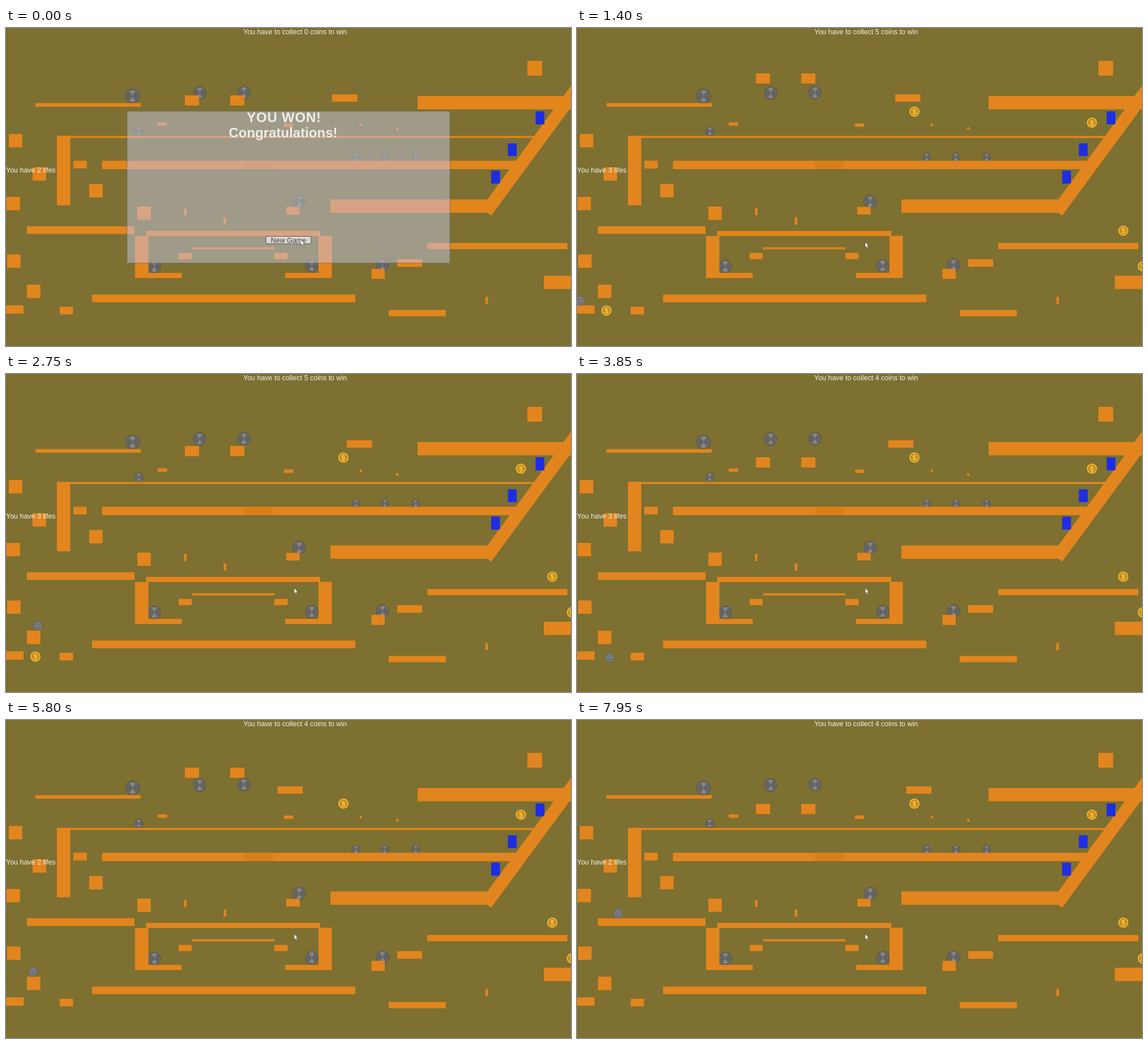
An HTML page that plays this animation: 998 px wide and 561 px high, repeating every 8 s.

```html
<!DOCTYPE html>
<html lang="en">
<head>
<meta charset="utf-8">
<title>Platform game</title>
<style>
  html, body { margin: 0; width: 100%; height: 100%; overflow: hidden; background: #7d7031; }
  svg { display: block; width: 100vw; height: 100vh; }
  text { font: 12.48px "Liberation Sans", Arial, sans-serif; fill: #f3f2ec; }
  .title { font-size: 24px; font-weight: bold; fill: #ededea; text-anchor: middle; }
  .wide { letter-spacing: .8px; }
  .button { fill: #44423f; text-anchor: middle; }
  .beams { stroke: #e2851e; fill: none; }
  .solid { fill: #e2851e; stroke: none; }
</style>
</head>
<body>
<svg viewBox="0 0 998 561">
  <defs>
    <g id="saw">
      <circle r="11.1" fill="#646465" stroke="#4a4a4a" stroke-width=".9" stroke-dasharray="2.2 .6"/>
      <circle r="9.6" fill="none" stroke="#757576" stroke-width=".6"/>
      <path d="M-4.6-7.8A9 9 0 0 1 4.6-7.8L-4.6 7.8A9 9 0 0 0 4.6 7.8Z" fill="#868687"/>
      <circle r="2.6" fill="#5c5c5c"/>
      <circle r="1.3" fill="#8a8a7c"/>
    </g>
    <use id="chip" href="#saw" transform="scale(.65)"/>
    <g id="coin">
      <circle r="9" fill="#f0bd3d"/>
      <circle r="7.2" fill="#c98a14"/>
      <text y="4.5" text-anchor="middle" style="font-size:12.5px;font-weight:bold;fill:#f6cd55">$</text>
    </g>
    <!-- blends the translucent panel in linear light -->
    <filter id="glass" filterUnits="userSpaceOnUse" x="0" y="0" width="998" height="561">
      <feFlood x="214" y="147" width="570" height="267.5" flood-color="#c7c7c7" flood-opacity=".4" result="pane"/>
      <feMerge><feMergeNode in="SourceGraphic"/><feMergeNode in="pane"/></feMerge>
    </filter>
  </defs>

  <g id="scene">
    <rect width="998" height="561" fill="#7d7031"/>
    <use href="#saw" transform="translate(223.5 120) scale(1.1)"/>
    <use href="#saw" x="342" y="114.7"/>
    <use href="#saw" x="420.3" y="114"/>
    <use href="#saw" x="518" y="306.3"/>
    <use href="#saw" x="262" y="420.6"/>
    <use href="#saw" x="540" y="419.5"/>
    <use href="#saw" x="665" y="418.3"/>
    <use href="#saw" transform="translate(234.6 182.2) scale(.7)"/>
    <use href="#chip" x="617.6" y="228.3"/>
    <use href="#chip" x="669" y="228.3"/>
    <use href="#chip" x="723.6" y="228.3"/>

    <g class="beams">
      <path stroke-width="26" d="M921 71h26"/>
      <path stroke-width="23.6" d="M727 131.8H998M573 314.2H852M950 448.8H998M101.7 190.3V312.8M239.7 367V441M563.8 366.6V441
        M5 198.8h23.7M47 257.5h23.7M147 287h23.7M1 309.8h23.7M232 326.8h23.7M2 411.2h23.7M37 464.6h23.7"/>
      <path stroke-width="17.8" d="M645.5 433.8H669"/>
      <path stroke-width="14.6" d="M169.5 241.6H901M0 496.6H31"/>
      <path stroke-width="13.5" d="M37 356.5H227M152 477H617M691 414.6H735M119 241h23.7M495 322.3h23.7M94.7 498.4h23.7"/>
      <path stroke-width="11" d="M744 384.7H991.5M676 503H777M305 402.2H328M474 402.2H497.5"/>
      <path stroke-width="9" d="M247.5 362.5H555M228 436.5H310.5M493 436.5H575"/>
      <path stroke-width="6.2" d="M52 135.7H238M268 169.5h16.5M491 171.5h16.5"/>
      <path stroke-width="4.6" d="M316.7 317.5v12.6M386.7 334v12.9M849 474.5v12.5M624.5 171h4M689 177.2h4.5"/>
      <path stroke-width="3.6" d="M90 192.2H932M328.5 388.6H474"/>
      <path class="solid" d="M998 102L839 317.7L857 331L998 139.7Z"/>
      <rect class="solid" id="slider" y="117" width="44.5" height="13"/>
      <path class="solid" id="lifts" d="M316 0h25v18h-25zM396 0h25v18h-25z"/>
    </g>
    <rect x="420" y="234.3" width="52" height="14.6" fill="#d97e19"/>
    <g fill="#1f2de2">
      <rect x="935.5" y="147" width="15.5" height="23"/>
      <rect x="886.5" y="203.5" width="15.5" height="22.5"/>
      <rect x="857" y="251.5" width="15.5" height="23" rx="1.5"/>
    </g>
    <g id="coins">
      <use href="#coin" x="596" y="147.5"/>
      <use href="#coin" x="909.5" y="167"/>
      <use href="#coin" x="965" y="357.5"/>
      <use href="#coin" x="999.5" y="420.5"/>
      <use id="prize" href="#coin" x="52" y="498.5"/>
    </g>
    <g id="ball">
      <circle r="8.2" fill="#7b7b7c" stroke="#505051" stroke-width=".9" stroke-dasharray="2 .6"/>
      <path d="M-4-1.8h2M2-1.8h2M-2.5 3.2Q0 4.6 2.5 3.2" fill="none" stroke="#4c4c4d" stroke-width=".9"/>
    </g>
    <text id="goal" x="419" y="11.3"></text>
    <text id="lives" x="0" y="255"></text>
  </g>

  <g id="panel">
    <rect x="213.8" y="146.8" width="570.4" height="267.7" rx="3" fill="none" stroke="#6c675b" stroke-width=".7"/>
    <text class="title wide" x="491" y="166.3">YOU WON!</text>
    <text class="title" x="489.5" y="193">Congratulations!</text>
    <rect x="459" y="367.5" width="80" height="13.3" rx="3" fill="#d9d7d4" stroke="#4b4943" stroke-width=".9"/>
    <text class="button" x="499" y="378.5">New Game</text>
  </g>
  <path id="cursor" d="M0 0V9.6L2.1 7.7L3.7 11.4L5.2 10.8L3.6 7.2H6.4Z" fill="#fff" stroke="#3b3728" stroke-width=".5"/>
</svg>
<script>
const LOOP = 8000, START = 150, COIN = 3750, DEATH = 3900;
const GRAVITY = 2.08e-4; // px per ms squared
const $ = id => document.getElementById(id);

// The ball's touchdowns: time, x, y. It rolls between equal heights and flies otherwise.
const route = [
  [START, 5, 460], [600, 5, 481], [2050, 5, 481], [2700, 55, 444], [3050, 66, 444], [DEATH, 57, 508],
  [DEATH, 5, 460], [4350, 5, 481], [4600, 5, 481], [5550, 48, 444], [5900, 48, 444],
  [6900, 29, 391.3], [6950, 26, 391.3], [7950, 72.7, 341]
];

// The picture stands still from the end of one stretch to the start of the next.
const stretches = [[0, 2200], [2550, 3350], [3600, 4550], [4700, 4900], [5200, 6050], [6400, 7150], [7500, 7950]];

function held(t) {
  const [, end] = stretches.filter(s => s[0] <= t).pop();
  return Math.min(end, Math.floor(t / 50) * 50);
}

// Back and forth between low and low + span
const shuttle = (way, low, span) => low + span - Math.abs(way % (2 * span) - span);

function ballAt(t) {
  const next = route.findIndex(k => k[0] > t);
  if (next < 1) return route[next < 0 ? route.length - 1 : 0].slice(1);
  const [t0, x0, y0] = route[next - 1], [t1, x1, y1] = route[next];
  const p = (t - t0) / (t1 - t0);
  const arc = y0 === y1 ? 0 : GRAVITY / 2 * (t - t0) * (t1 - t);
  return [x0 + (x1 - x0) * p, y0 + (y1 - y0) * p - arc];
}

const show = (id, on) => $(id).setAttribute("visibility", on ? "inherit" : "hidden");
const move = (id, x, y) => $(id).setAttribute("transform", `translate(${x} ${y})`);

function draw(t) {
  const won = t < START, paid = t >= COIN, lost = t >= DEATH;
  const glide = Math.min(1, Math.max(0, (t - 600) / 550));

  move("slider", won ? 576 : shuttle(27.2 + .0474 * t, 468.5, 145.5), 0);
  move("lifts", 0, won ? 118.7 : shuttle(105.5 + .04 * t, 76.5, 82.5));
  move("ball", ...ballAt(t));
  move("cursor", 521 - 12 * glide, 373.5 + 4 * glide);

  $("scene").setAttribute("filter", won ? "url(#glass)" : "none");
  show("panel", won);
  show("ball", !won);
  show("coins", !won);
  show("prize", !won && !paid);
  $("goal").textContent = `You have to collect ${won ? 0 : paid ? 4 : 5} coins to win`;
  $("lives").textContent = `You have ${won || lost ? 2 : 3} lifes`;
}

let start, last;
function frame(now) {
  start ??= now;
  const t = held((now - start) % LOOP);
  if (t !== last) draw(last = t);
  requestAnimationFrame(frame);
}
draw(0);
requestAnimationFrame(frame);
</script>
</body>
</html>
```
